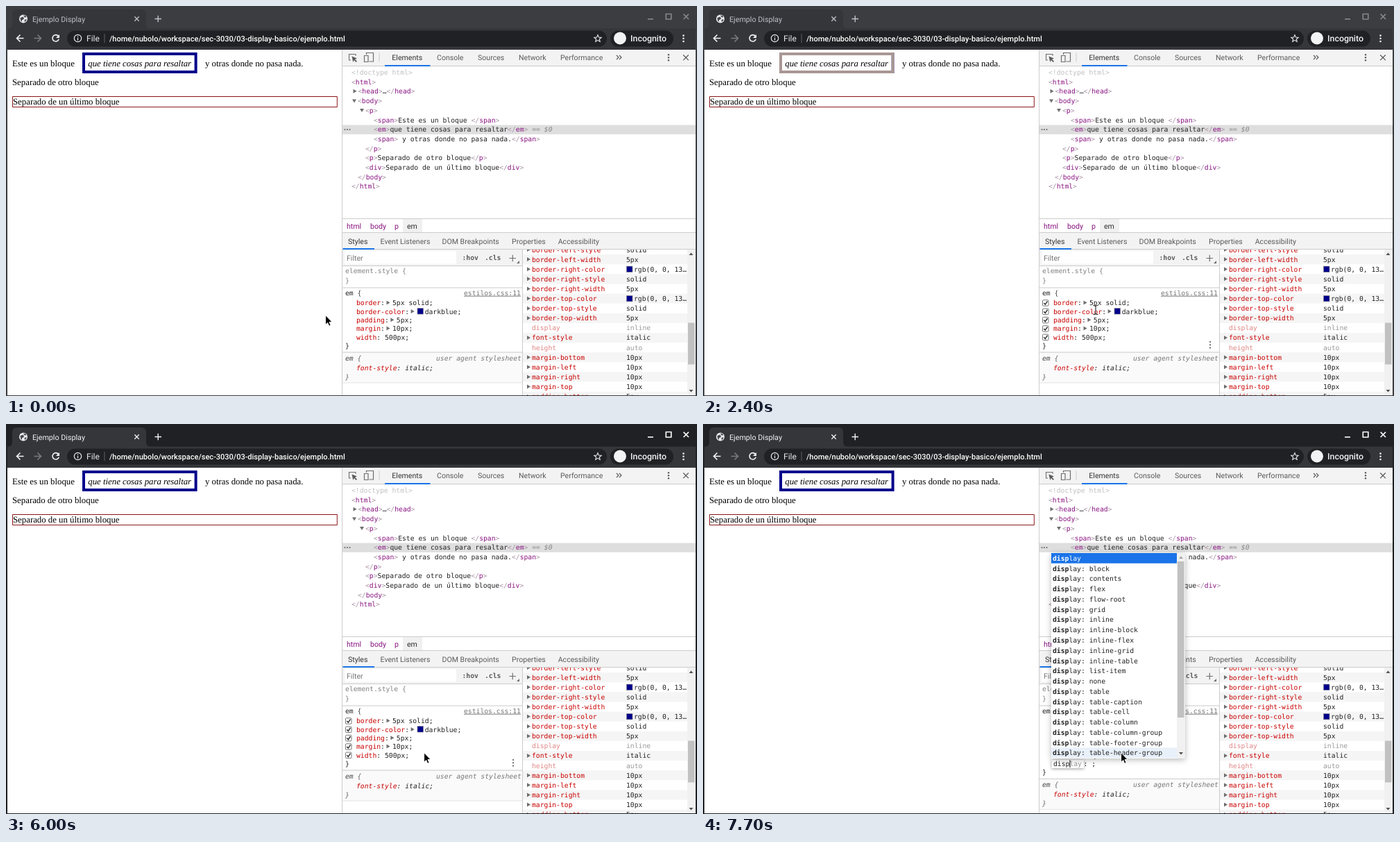
These frames come from a looping animation (996x562 px, 8 s). An HTML page:

```html
<!DOCTYPE html>
<html lang="es">
<head>
<meta charset="utf-8">
<title>Ejemplo Display</title>
<style>
html, body { margin: 0; width: 100%; height: 100%; overflow: hidden; background: #fff; }
svg { display: block; width: 100vw; height: 100vh; }
text { white-space: pre; text-rendering: geometricPrecision; }
.ui { font-family: Roboto, sans-serif; }
.mono { font-family: "DejaVu Sans Mono", monospace; font-size: 9.73px; }
.serif { font-family: "Liberation Serif", serif; font-size: 12.8px; }
.popup { filter: drop-shadow(0 2px 4px rgba(0, 0, 0, .28)); }
.editor { filter: drop-shadow(0 1px 2px rgba(0, 0, 0, .4)); }
</style>
</head>
<body>
<svg id="stage" viewBox="0 0 996 562" preserveAspectRatio="none"></svg>
<script>
const LOOP = 8000, TICK = 100, CHAR = 5.857, ROW = 12.34;
const RED = '#c80000', INK = '#222', TAG = '#881280', BRACKET = '#a894a6';
const BLUE = '#1a73e8', NAVY = '#00008b', LINE = '#ccc', BAR = '#f3f3f3';

const esc = s => s.replace(/&/g, '&amp;').replace(/</g, '&lt;').replace(/>/g, '&gt;');
const rect = (x, y, w, h, fill, more = '') =>
  `<rect x="${x}" y="${y}" width="${w}" height="${h}" fill="${fill}" ${more}/>`;
const path = (d, stroke, width = 1, more = '') =>
  `<path d="${d}" fill="none" stroke="${stroke}" stroke-width="${width}" ${more}/>`;
const shape = (d, fill) => `<path d="${d}" fill="${fill}"/>`;
const dot = (x, y, r, fill) => `<circle cx="${x}" cy="${y}" r="${r}" fill="${fill}"/>`;
const text = (cls, x, y, s, fill, more = '') =>
  `<text class="${cls}" x="${x}" y="${y}" fill="${fill}" ${more}>${esc(s)}</text>`;
const ui = (x, y, s, fill, size = 10.6, more = '') =>
  text('ui', x, y, s, fill, `font-size="${size}" ${more}`);
const serif = (x, y, s, more) => text('serif', x, y, s, '#000', more);
// Each run is [text, fill, attributes].
const mono = (x, y, ...runs) => `<text class="mono" x="${x}" y="${y}">` +
  runs.map(([s, fill = INK, more = '']) => `<tspan fill="${fill}" ${more}>${esc(s)}</tspan>`).join('') + '</text>';
const ITALIC = 'font-style="italic"', BOLD = 'font-weight="bold"', MEDIUM = 'font-weight="500"';
const right = (x, y) => shape(`M${x} ${y - 3}l5 3-5 3z`, '#6e6e6e');
const down = (x, y) => shape(`M${x} ${y - 2}h6l-3 5z`, '#6e6e6e');
const dots = (x, y, gap, r, fill) => [-gap, 0, gap].map(d => dot(x, y + d, r, fill)).join('');
const cross = (x, y, r, color, w) =>
  path(`M${x - r} ${y - r}l${2 * r} ${2 * r}m0 ${-2 * r}l${-2 * r} ${2 * r}`, color, w);

function browser(active) {
  const frame = active ? '#202124' : '#3c3d40';
  const ctl = active ? '#fff' : '#85878a';
  const title = active ? '#f1f3f4' : '#bdc1c6';
  const star = Array.from({ length: 10 }, (_, i) => {
    const a = i * Math.PI / 5 - Math.PI / 2, r = i % 2 ? 2.4 : 5.4;
    return `${(853 + r * Math.cos(a)).toFixed(2)} ${(47 + r * Math.sin(a)).toFixed(2)}`;
  }).join('L');
  return rect(0, 0, 996, 562, frame) +
    shape('M2 33Q9 33 9 26V12Q9 5 16 5H195Q202 5 202 12V26Q202 33 209 33Z', '#35363a') +
    rect(2, 32.5, 992, 30.5, '#35363a') +
    dot(25, 18.5, 6, '#e8eaed') +
    shape('M20.5 17l4-1.5 1.5 2-1 2-2 .5v3q-2.5-2-2.5-6zM25 13.5l3 .5 1.5 2-2.5.5zM27 19.5l3 0-2.5 3.5-1-1.5z', '#45464a') +
    ui(38, 22.5, 'Ejemplo Display', title, 10.75) +
    cross(188.5, 18.5, 3.2, title, 1.3) +
    path('M214.5 18.5h9.5M219.25 13.75v9.5', title, 1.4) +
    path('M925 18.8h8', ctl, 1.6) + path('M951.3 11.5h7.5v7.5h-7.5z', ctl, 1.6) +
    cross(980.3, 15.3, 3.7, ctl, 1.6) +
    path('M25.5 46.5h-10m5-5l-5 5 5 5', '#f1f3f4', 1.6) +
    path('M40.5 46.5h10m-5-5l5 5-5 5', '#797b7f', 1.6) +
    path('M75.5 43.5a4.7 4.7 0 1 0 .7 4.2', '#f1f3f4', 1.6) + shape('M77 41v5h-5z', '#f1f3f4') +
    rect(88, 35.5, 778, 23, '#202124', 'rx="11.5"') +
    path('M98.3 46.5a5.2 5.2 0 1 0 10.4 0a5.2 5.2 0 1 0-10.4 0M103.5 45.7v3.8M103.5 43.3v1.3', '#e8eaed', 1.2) +
    ui(116, 50.5, 'File', '#e8eaed', 12) + rect(141.5, 40, 1, 13, '#5f6368') +
    ui(149, 50.5, '/home/nubolo/workspace/sec-3030/03-display-basico/ejemplo.html', '#fff', 11.03, MEDIUM) +
    path(`M${star}Z`, '#e8eaed', 1.1) +
    rect(871, 35.5, 91, 23, '#202124', 'rx="11.5"') +
    dot(885, 46.5, 9, '#f1f3f4') +
    ui(900, 50.8, 'Incognito', '#f1f3f4', 12.4, MEDIUM) +
    dots(976.5, 46.8, 4.2, 1.3, '#f1f3f4') +
    rect(2, 63, 992, 498, '#fff');
}

const ring = (x, y, w, h, b) =>
  `M${x} ${y}h${w}v${h}h${-w}zM${x + b} ${y + b}v${h - 2 * b}h${w - 2 * b}v${2 * b - h}z`;

function page(mark) {
  const border = ring(110, 67, 165.6, 30, 4);
  return serif(9, 86.7, 'Este es un bloque') +
    shape(border, NAVY) +
    serif(118.3, 86.7, 'que tiene cosas para resaltar', ITALIC) +
    serif(287, 86.7, 'y otras donde no pasa nada.') +
    serif(9, 114, 'Separado de otro bloque') +
    path('M9.5 130.5h467.8v15.1H9.5z', '#8b1414') +
    serif(10, 142, 'Separado de un último bloque') +
    (mark === 'border' ? shape(border, 'rgba(255,229,153,.66)') : '') +
    (mark === 'padding' ? shape(ring(114, 71, 157.6, 22, 4), 'rgba(147,196,125,.55)') : '') +
    (mark === 'margin' ? shape('M102 67h8v30h-8zM275.6 67h8v30h-8z', 'rgba(246,178,107,.66)') : '');
}

const tree = [
  [498, '<html>'], [507.5, '<head>…</head>', right], [507, '<body>', down], [518, '<p>', down],
  [530, '<span>Este es un bloque </span>'], [530, '<em>que tiene cosas para resaltar</em>'],
  [530, '<span> y otras donde no pasa nada.</span>'], [518, '</p>'],
  [518, '<p>Separado de otro bloque</p>'], [518, '<div>Separado de un último bloque</div>'],
  [507, '</body>'], [498, '</html>']
];

const markup = s => s.split(/(<\/?\w+>)/).filter(Boolean).flatMap(p => {
  const m = p.match(/^(<\/?)(\w+)>$/);
  return m ? [[m[1], BRACKET], [m[2], TAG], ['>', BRACKET]] : [[p]];
});

function elements() {
  let out = rect(484, 63, 1, 498, LINE) + rect(485, 63, 509, 23.5, BAR) + rect(485, 86, 509, 1, LINE) +
    path('M504 72v-2.5h-9.5v8.5h2.5', '#6e6e6e', 1.1) +
    shape('M498.5 72.5l7.5 3-3 1.2 3 3-1.3 1.3-3-3-1.4 3z', '#5a5a5a') +
    path('M519.5 70v-2.500h10v12.500h-6M516.500 71.500h5.500v9h-5.500z', '#6e6e6e', 1.2) +
    rect(537.5, 67.5, 1, 13, LINE);
  [[556.3, 'Elements'], [621, 'Console'], [680, 'Sources'], [739, 'Network'], [799, 'Performance']]
    .forEach(([x, s], i) => out += ui(x, 78, s, i ? '#5a5a5a' : '#333'));
  out += rect(546, 85, 65.5, 2, BLUE) +
    path('M880 71l3 3-3 3m4-6l3 3-3 3', '#5a5a5a', 1.2) +
    dots(955, 74.3, 4, 1.2, '#5a5a5a') + cross(980, 74.3, 3.8, '#5a5a5a', 1.3) +
    rect(485, 171.5, 509, 13.3, '#dedede') + mono(498, 99, ['<!doctype html>', '#c0c0c0']);
  tree.forEach(([x, s, arrow], i) => {
    const y = 112.7 + 13.7 * i, runs = markup(s);
    if (s.startsWith('<em>')) runs.push([' == $0', '#888', ITALIC]);
    if (arrow) out += arrow(x - (arrow === right ? 7 : 8), y - 3.7);
    out += mono(x, y, ...runs);
  });
  out += [488.5, 492, 495.5].map(x => dot(x, 178, 1.1, '#6e6e6e')).join('');
  out += rect(485, 306, 509, 1, LINE) + rect(572, 307, 28, 19, '#f0f0f0') + rect(485, 326, 509, 1, LINE);
  [[491, 'html'], [525, 'body'], [560, 'p'], [578, 'em']]
    .forEach(([x, s], i) => out += ui(x, 320.5, s, i < 3 ? TAG : '#303030'));
  out += rect(485, 327, 509, 24, BAR) + rect(485, 350, 509, 1, LINE) + rect(485.5, 349, 45.5, 2, BLUE);
  [[493, 'Styles'], [539.5, 'Event Listeners'], [628.5, 'DOM Breakpoints'], [729, 'Properties'], [795.7, 'Accessibility']]
    .forEach(([x, s], i) => out += ui(x, 343, s, i ? '#5a5a5a' : '#333'));
  return out;
}

const rules = [
  ['border:', '5px solid;', 1], ['border-color:', 'darkblue;', 2], ['padding:', '5px;', 1],
  ['margin:', '10px;', 1], ['width:', ' 500px;', 0]
];
const valueX = ([name, , kind]) => 505 + name.length * CHAR + [0, 11, 22.5][kind];
const swatch = (x, y) => rect(x, y, 8.5, 8.5, NAVY, 'stroke="#8a8a8a" stroke-width=".6"');

function styles(hover, editing) {
  const dy = editing ? ROW : 0;
  let out = rect(485, 351, 259, 23, BAR) + rect(488, 353, 161, 18.5, '#fff') +
    ui(491, 366.5, 'Filter', '#757575') +
    mono(657.5, 366, [':hov', '#5a5a5a', BOLD]) + mono(690, 366, ['.cls', '#5a5a5a', BOLD]) +
    path('M725.5 363.5h9.5M730.25 358.75v9.5', '#6e6e6e', 1.2) + shape('M740 367v4h-4z', '#6e6e6e') +
    rect(485, 374, 259, 1, LINE) +
    mono(489, 385.2, ['element.style {', '#808080']) + mono(489, 399.4, ['}', '#808080']) +
    rect(485, 405.5, 259, 1, LINE) + mono(489, 416.7, ['em'], [' {', '#444']) +
    mono(660, 416.7, ['estilos.css:11', '#777', 'text-decoration="underline"']);
  rules.forEach((rule, i) => {
    const y = 431.2 + ROW * i, end = 505 + rule[0].length * CHAR, x = valueX(rule);
    out += mono(505, y, [rule[0].slice(0, -1), RED], [':']) + mono(x, y, [rule[1]]);
    if (rule[2]) out += right(end + 2.5, y - 3.6);
    if (rule[2] > 1) out += swatch(593, y - 8);
    if (hover) out += rect(489.5, y - 7.5, 8.5, 8.5, '#fff', 'rx="1.2" stroke="#767676"') +
      path(`M491.3 ${y - 3.3}l2 2.2 3.2-4.8`, '#333', 1.5);
  });
  if (hover) out += dots(731, 488.3, 4.3, 1.1, '#5a5a5a');
  return out + mono(489, 493 + dy, ['}']) +
    rect(485, 498.5 + dy, 259, 44, '#fafafa') + rect(485, 498.5 + dy, 259, 1, LINE) +
    mono(489, 510.7 + dy, ['em', '#444', ITALIC], [' {', '#666', ITALIC]) +
    mono(620, 510.7 + dy, ['user agent stylesheet', '#777', ITALIC]) +
    mono(505, 524.5 + dy, ['font-style', RED, ITALIC], [': italic;', INK, ITALIC]) +
    mono(489, 537.5 + dy, ['}', '#666', ITALIC]) + rect(485, 542.5 + dy, 259, 1, '#e4e4e4');
}

const sides = 'border-left-style border-left-width border-right-color border-right-style border-right-width ' +
  'border-top-color border-top-style border-top-width display font-style height ' +
  'margin-bottom margin-left margin-right margin-top padding-bottom';
const fixed = { display: 'inline', 'font-style': 'italic', height: 'auto' };

function valueOf(name) {
  if (fixed[name]) return fixed[name];
  if (name.endsWith('color')) return 'rgb(0, 0, 13…';
  if (name.endsWith('-style')) return 'solid';
  return name.startsWith('margin') ? '10px' : '5px';
}

function computed() {
  const step = 14.11;
  let out = '<clipPath id="pane"><rect x="744" y="351" width="250" height="210"/></clipPath><g clip-path="url(#pane)">';
  sides.split(' ').forEach((name, i) => {
    const mid = 351 + step * i, y = mid + 3.5, dim = name === 'display' || name === 'height';
    const color = name.endsWith('color');
    if (i % 2) out += rect(745, mid - 7, 237, step, '#f5f5f5');
    if (!dim) out += right(751, mid);
    if (color) out += swatch(894.5, mid - 4.2);
    out += mono(758, y, [name, dim ? '#e08585' : RED]) +
      mono(color ? 905 : 894, y, [valueOf(name), dim ? '#999' : INK]);
  });
  return out + '</g>' + rect(744, 351, 1, 210, LINE) + rect(982, 351, 12, 210, '#f1f1f1') +
    rect(983, 456.5, 9.5, 60, '#c1c1c1') +
    shape('M984.5 359h6l-3-3.5z', '#505050') + shape('M984.5 553h6l-3 3.5z', '#505050');
}

const values = ('block contents flex flow-root grid inline inline-block inline-flex inline-grid inline-table ' +
  'list-item none table table-caption table-cell table-column table-column-group table-footer-group ' +
  'table-header-group').split(' ').map(v => 'display: ' + v);

function popup(n) {
  const wide = n < 4, w = wide ? 268 : 193, bar = 502 + w - 12, h = 14.76;
  const list = (n < 3 ? ['direction', 'display', 'direction: ltr', 'direction: rtl'] : ['display'])
    .concat(values).slice(0, 20);
  const chosen = n < 3 ? 1 : 0;
  let out = `<g class="popup">${rect(502, 186, w, 296, '#fff')}</g>`;
  list.forEach((s, i) => {
    const y = 186 + h * i, ink = i === chosen ? '#fff' : INK;
    if (i === chosen) out += rect(502, y, w - 12, h, BLUE);
    if (i === 19) out += rect(502, y, w - 12, h, '#e8f0fa');
    out += mono(504, y + 10.9, [s.slice(0, n), ink, BOLD], [s.slice(n), ink]);
  });
  return out + rect(bar, 186, 12, 296, '#f1f1f1') +
    rect(bar + 1, 198, 9.5, [0, 24, 200, 225, 225][n], '#c1c1c1') +
    shape(`M${bar + 3} 194h6l-3-3.5z`, '#a3a3a3') + shape(`M${bar + 3} 473h6l-3 3.5z`, '#505050');
}

function editor(n, caret) {
  const word = n ? 'display' : '', end = 505 + word.length * CHAR;
  return `<g class="editor">${rect(502.5, 484, end + 3 - 502.5, 12, '#fff')}</g>` +
    mono(505, 492.9, [word.slice(0, n)], [word.slice(n), '#999']) +
    mono(end + 2.5, 492.9, [': ;']) +
    (caret ? rect(505 + n * CHAR, 484.5, 1, 10.5, '#000') : '');
}

// Pointer moves: first step, last step, bend, end point.
const start = [461, 446];
const moves = [
  [300, 500, [390, 210], [251, 105]],
  [700, 800, [238, 99], [224, 95]],
  [1100, 1100, [300, 95], [300, 95]],
  [1200, 1500, [230, 80], [106, 82]],
  [1600, 1900, [110, 120], [200, 186]],
  [2000, 2400, [470, 400], [566, 438]],
  [2900, 3100, [578, 443], [592, 452]],
  [3200, 3600, [584, 467], [562, 477]],
  [3800, 3800, [561, 477], [561, 477]],
  [5200, 5300, [552, 477], [542, 477]],
  [5400, 5700, [575, 478], [603, 474]]
];

function pointer(t) {
  let from = start;
  for (const [t0, t1, bend, to] of moves) {
    if (t < t0) break;
    const k = Math.min(1, (t - t0 + TICK) / (t1 - t0 + TICK)), j = 1 - k;
    from = [0, 1].map(i => j * j * from[i] + 2 * j * k * bend[i] + k * k * to[i]);
  }
  return from;
}

const ruleAt = (x, y) => x > 485 && x < 744 ? Math.floor((y - 421.8) / ROW) : -1;

function overText(x, y) {
  const rule = rules[ruleAt(x, y)];
  if (rule) return x > 503 && x < valueX(rule) + rule[1].length * CHAR;
  return [[74, 91, 430], [104, 117, 134], [131, 146, 164]].some(([a, b, end]) => y > a && y < b && x < end);
}

function cursor(x, y, beam) {
  const d = beam ? 'M-3.5-6.5Q0-6.5 0-5Q0-6.5 3.5-6.5M0-5V5M-3.5 6.5Q0 6.5 0 5Q0 6.5 3.5 6.5'
    : 'M-.4-.2V13.2L2.7 10.4 4.7 15.2 7 14.2 5 9.5H9Z';
  return `<g transform="translate(${x} ${y})">` + (beam
    ? path(d, '#fff', 2.4, 'opacity=".7"') + path(d, '#222', 1.1)
    : `<path d="${d}" fill="#000" stroke="#fff" stroke-width=".9" stroke-linejoin="round"/>`) + '</g>';
}

const stage = document.getElementById('stage');
const keys = [7000, 7100, 7200, 7700];
const fixedPanes = elements() + computed();

function draw(t) {
  const [x, y] = pointer(t);
  const editing = t >= 6100;
  const n = keys.filter(k => t >= k).length;
  const hover = !editing && x > 485 && x < 744 && y > 406 && y < 498;
  const mark = hover ? ['border', 'border', 'padding', 'margin'][ruleAt(x, y)] : '';
  stage.innerHTML = browser(t >= 6000) + page(mark) + fixedPanes + styles(hover, editing) +
    (editing ? editor(n, t < 6700 || n > 0) : '') + (n ? popup(n) : '') +
    cursor(x, y, !n && overText(x, y));
}

let last = -1;
function loop() {
  const t = Math.floor(performance.now() % LOOP / TICK) * TICK;
  if (t !== last) draw(last = t);
  requestAnimationFrame(loop);
}
loop();
</script>
</body>
</html>
```
